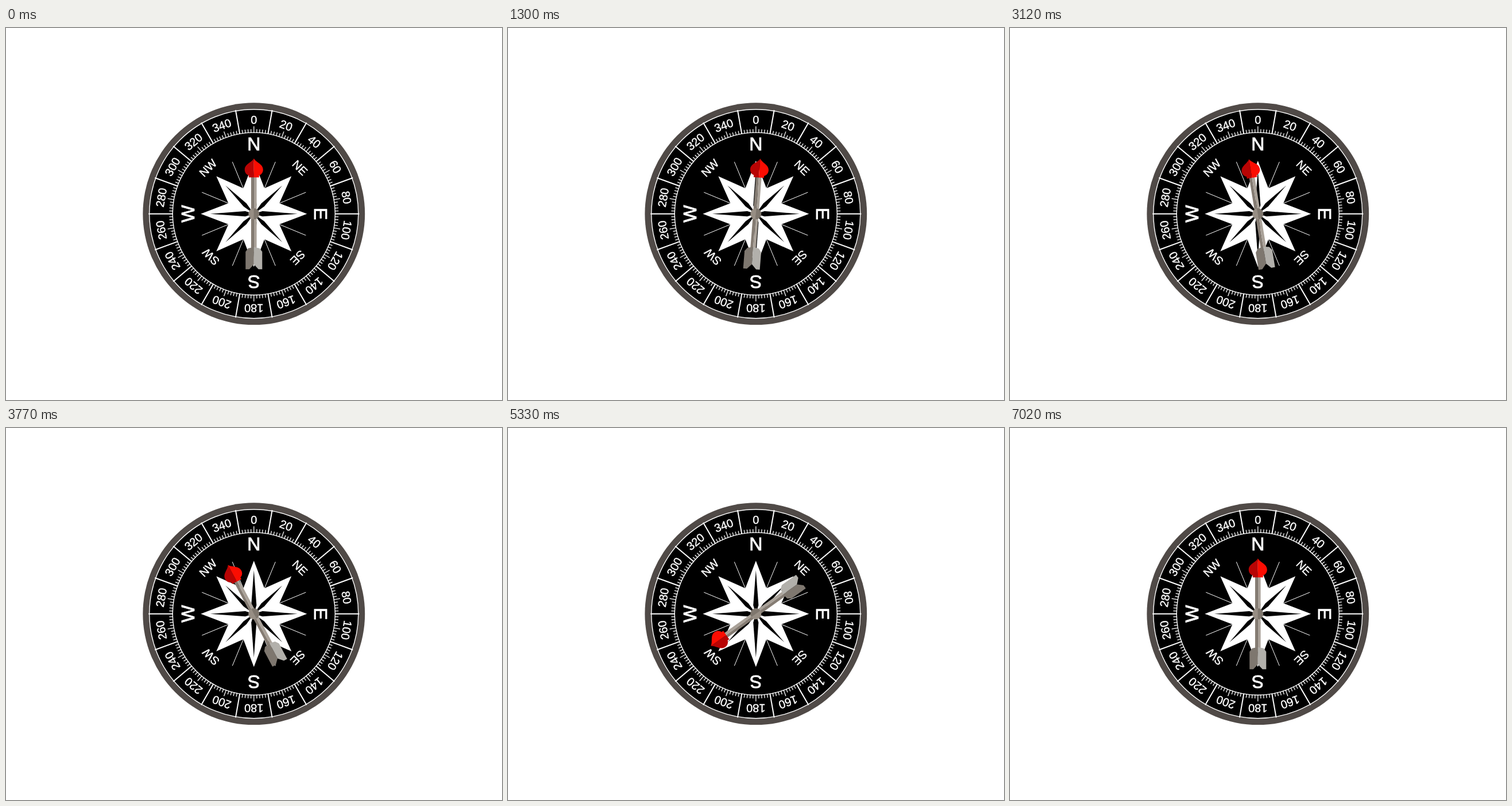
These frames come from a looping animation (864x648 px, 7.28 s). An HTML page:

```html
<!DOCTYPE html>
<html lang="en">
<head>
<meta charset="utf-8">
<title>Compass</title>
<style>
  html, body { margin: 0; width: 100%; height: 100%; overflow: hidden; background: #fff; }
  svg { display: block; width: 864px; height: 648px; }
  text {
    font-family: "Liberation Sans", Arial, sans-serif;
    fill: #fff; stroke: #fff; text-anchor: middle;
  }
</style>
</head>
<body>
<svg viewBox="0 0 864 648">
  <g transform="translate(431.8 323.7)">
    <circle r="193.4" fill="#504a47"/>
    <circle r="182" stroke="#fff" stroke-width="1.4"/>
    <circle r="141.6" fill="none" stroke="#fff" stroke-width="1.4"/>
    <g id="dial"></g>
    <g id="needle">
      <path d="M-4.8-66H0V66H-4.8Z" fill="#857c73"/>
      <path d="M0-66H4.8V66H0Z" fill="#aaa299"/>
      <path d="M0 58L-10 60-14.5 66V96.5H-8L0 88Z" fill="#7e776f"/>
      <path d="M0 58L10 60 14.5 66V96.5H8L0 88Z" fill="#b2b0ab"/>
      <path d="M0-96.5C-4-89-16-87-16-77C-16-71-12-68-9-67V-63.5H0Z" fill="#b80404"/>
      <path d="M0-96.5C4-89 16-87 16-77C16-71 12-68 9-67V-63.5H0Z" fill="#fb0d02"/>
      <path d="M0-9.6A9.6 9.6 0 0 0 0 9.6Z" fill="#978e84"/>
      <path d="M0-9.6A9.6 9.6 0 0 1 0 9.6Z" fill="#7f776e"/>
    </g>
  </g>
</svg>
<script>
const dial = document.getElementById("dial");
const needle = document.getElementById("needle");

function add(tag, attrs, label) {
  const el = document.createElementNS("http://www.w3.org/2000/svg", tag);
  for (const key in attrs) el.setAttribute(key, attrs[key]);
  if (label !== undefined) el.textContent = label;
  dial.append(el);
}

// Bearings run clockwise from north.
function polar(deg, r) {
  const a = deg * Math.PI / 180;
  return [r * Math.sin(a), -r * Math.cos(a)];
}

function ray(deg, from, to, width) {
  const [x1, y1] = polar(deg, from), [x2, y2] = polar(deg, to);
  add("line", { x1, y1, x2, y2, stroke: "#fff", "stroke-width": width });
}

function label(str, deg, r, size, weight) {
  const [x, y] = polar(deg, r);
  add("text", {
    transform: `translate(${x} ${y}) rotate(${deg})`,
    y: size * 0.35, "font-size": size, "stroke-width": weight
  }, str);
}

for (let deg = 0; deg < 360; deg += 2) {
  if (deg % 20 === 10) ray(deg, 141, 183.5, 2);
  else ray(deg, 141, deg % 20 ? 147.5 : 152.5, 1.3);
  if (deg % 20 === 0) label(deg, deg, 163.8, 20, 0.4);
}

[["N", 122], ["E", 116.2], ["S", 118.5], ["W", 115]]
  .forEach(([name, r], i) => label(name, i * 90, r, 32, 0.9));
[["NE", 113.5], ["SE", 108], ["SW", 106], ["NW", 113]]
  .forEach(([name, r], i) => label(name, 45 + i * 90, r, 20, 0.4));

const star = [];
for (let i = 0; i < 16; i++) star.push(polar(i * 22.5, i % 2 ? 48 : 92.5));
add("polygon", { points: star.join(" "), fill: "#fff" });

for (let i = 0; i < 8; i++) {
  const diagonal = i % 2;
  ray(22.5 + i * 45, 48, 98, 1);
  add("path", {
    d: diagonal ? "M0-70L3.6-22 0 0-3.6-22Z" : "M0-76L4.6-15 0 0-4.6-15Z",
    transform: `rotate(${i * 45})`
  });
}

// Needle swings as [step, bearing].
const STEP = 130, STEPS = 56;
const swings = [
  [0, 0], [3, 27], [8, 3.4], [14, 8.1], [15, 8.1], [24, -9.3], [28, -30.2],
  [30, -25.6], [36, -28.5], [41, -125.6], [46, 2.7], [51, 0], [STEPS, 0]
];

function bearing(step) {
  const i = swings.findIndex(([s]) => s > step);
  const [s0, a0] = swings[i - 1], [s1, a1] = swings[i];
  const ease = (1 - Math.cos(Math.PI * (step - s0) / (s1 - s0))) / 2;
  return a0 + (a1 - a0) * ease;
}

const start = performance.now();
function draw() {
  const step = Math.floor((performance.now() - start) / STEP) % STEPS;
  needle.setAttribute("transform", `rotate(${bearing(step)})`);
  requestAnimationFrame(draw);
}
draw();
</script>
</body>
</html>
```
